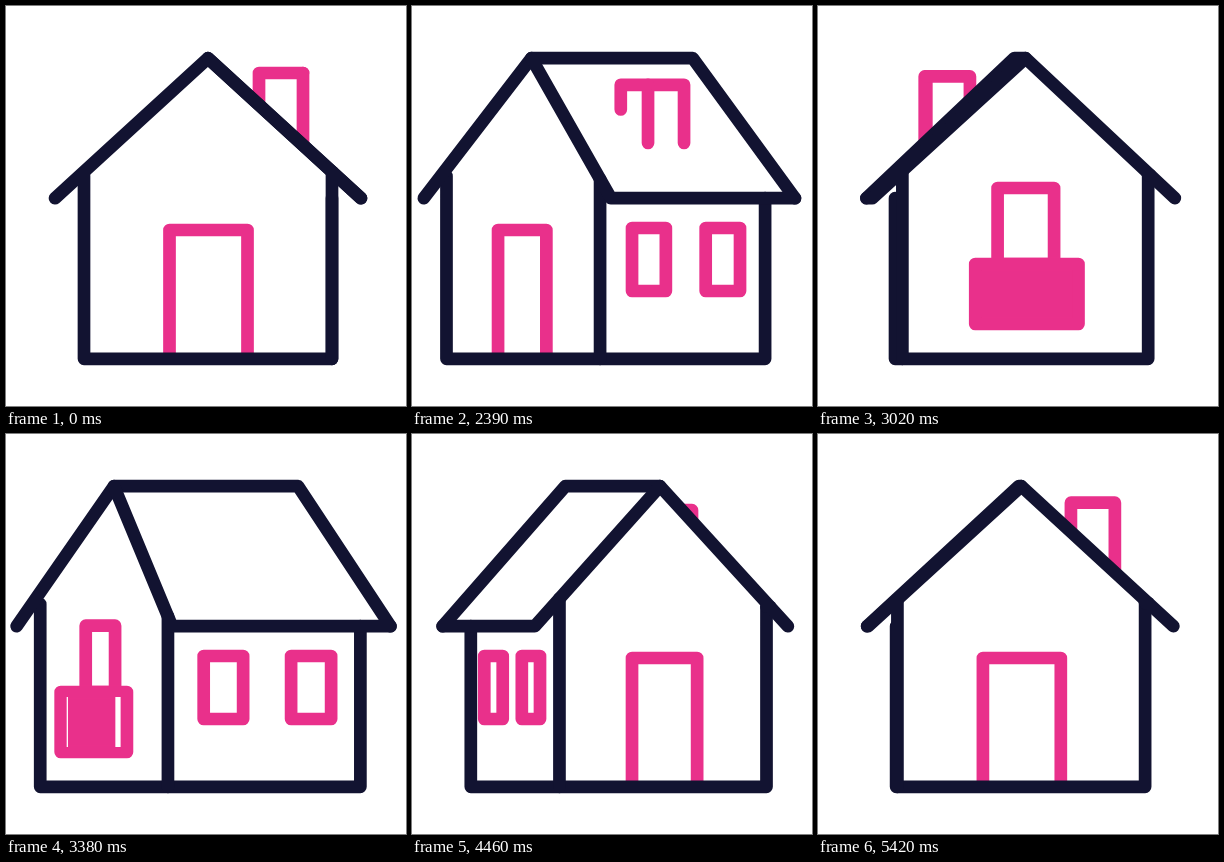
These frames come from a looping animation (400 by 400 pixels, 5450 ms). An HTML page with a canvas:

```html
<!DOCTYPE html>
<html lang="en">
<head>
<meta charset="utf-8">
<title>Turning house</title>
<style>
html, body { margin: 0; width: 100%; height: 100%; overflow: hidden; background: #fff; }
canvas { display: block; width: 400px; height: 400px; }
</style>
</head>
<body>
<canvas id="stage"></canvas>
<script>
const NAVY = '#121331', PINK = '#e9308b', WHITE = '#fff';
const LOOP = 5450, START = 2000, STEP = 30;
const TOP = 52.2, EAVE = 192.2, FLOOR = 352.8;

// Turn of the house: [ms since start, degrees]
const TURN = [[0, 0], [690, 107], [1380, 239], [1950, 299], [2460, 326.6], [2865, 342], [3450, 358]];

const canvas = document.getElementById('stage');
const ctx = canvas.getContext('2d');
const ratio = window.devicePixelRatio || 1;
canvas.width = canvas.height = 400 * ratio;

const rate = i => (TURN[i + 1][1] - TURN[i][1]) / (TURN[i + 1][0] - TURN[i][0]);

function slope(i) {
  if (i === 0) return .06;
  if (i === TURN.length - 1) return rate(i - 1);
  const before = TURN[i][0] - TURN[i - 1][0], after = TURN[i + 1][0] - TURN[i][0];
  return (after * rate(i - 1) + before * rate(i)) / (before + after);
}

function angleAt(ms) {
  if (ms <= 0) return 0;
  let i = 0;
  while (i < TURN.length - 2 && ms > TURN[i + 1][0]) i++;
  const [t0, a] = TURN[i], [t1, b] = TURN[i + 1];
  const h = t1 - t0, u = (ms - t0) / h, v = 1 - u;
  return a * v * v * (1 + 2 * u) + b * u * u * (3 - 2 * u) + h * u * v * (v * slope(i) - u * slope(i + 1));
}

function trace(points, closed) {
  ctx.beginPath();
  points.forEach(([x, y]) => ctx.lineTo(x, y));
  if (closed) ctx.closePath();
}

function line(color, points, closed = false, cap = 'round') {
  trace(points, closed);
  ctx.strokeStyle = color;
  ctx.lineCap = cap;
  ctx.stroke();
}

function fill(color, points) {
  trace(points, true);
  ctx.fillStyle = color;
  ctx.fill();
}

const box = (x0, y0, x1, y1) => [[x0, y0], [x1, y0], [x1, y1], [x0, y1]];

function block(x0, x1) {
  const shape = box(x0, 258, x1, 318);
  fill(PINK, shape);
  line(PINK, shape, true);
}

function drawHouse(degrees) {
  const a = degrees * Math.PI / 180;
  const cos = Math.cos(a), sin = Math.sin(a);
  const C = Math.abs(cos), S = Math.abs(sin);
  const q = sin * cos < 0 ? 1 : -1;      // side on which the gable shows
  const front = cos > 0, rightSide = sin >= 0;
  const depth = S ** 1.75;
  const cx = 200 + 2 * C ** 6;

  // Walls
  const side = 252 * depth;
  const outer = cx + q * (124 * C + side / 2 + 13 * S * C);
  const corner = outer - q * 248 * C;
  const end = corner - q * side;
  const mid = (outer + corner) / 2;

  // Roof
  const eave = 295 * S ** 1.95, span = (306 - 5 * S) * C;
  const tip = cx + q * (span / 2 + eave / 2 + 5.6 * S * C);
  const near = tip - q * span;
  const far = near - q * eave;
  const ridge = 116 * S ** 1.5;
  const apex = cx + q * ridge, back = cx - q * ridge;

  // Chimney
  const cap = 67 + 14 * S ** .7;
  const chimneyX = (x, z) => cx + x * cos - z * depth;

  if (!rightSide) {
    const x0 = chimneyX(51, 0), x1 = chimneyX(95, 0);
    line(PINK, [[x0, 98], [x0, cap], [x1, cap], [x1, 137]]);
  }
  if (front) {
    const peek = 22 * S - 28 * C;
    if (peek > 0) block(end - q * peek, end + q * 8);
  }

  fill(WHITE, [[far, EAVE], [back, TOP], [apex, TOP], [near, EAVE]]);
  fill(WHITE, [[near, EAVE], [apex, TOP], [tip, EAVE]]);
  fill(WHITE, box(end, EAVE, outer, FLOOR));

  if (side > 20) {
    const along = f => end + q * side * f;
    const squeeze = .11 * (1 - S);
    line(PINK, box(along(.152), 222, along(.36), 285), true);
    line(PINK, box(along(.625 - squeeze), 222, along(.83 - squeeze), 285), true);
  }
  if (front) {
    const x = mid + 2 * q * S + .5, half = 39 * C;
    line(PINK, [[x - half, 347], [x - half, 224], [x + half, 224], [x + half, 347]], false, 'butt');
  }
  if (rightSide) {
    const z = front ? 35 : -20;
    const x0 = chimneyX(95, 35), x1 = chimneyX(95, -20);
    const edge = chimneyX(95, z), inner = chimneyX(51, z);
    line(PINK, [[x0, 137], [x0, cap], [x1, cap], [x1, 137]]);
    line(PINK, [[edge, cap], [inner, cap], [inner, 98 + 7 * S]]);
  }

  // Frame
  const reach = Math.abs(apex - near) < 1 ? 1 : (apex - corner) / (apex - near);
  const cornerTop = reach > 0 && reach < 1 ? TOP + (EAVE - TOP) * reach : EAVE;
  const wallTop = q > 0 ? 169 + 12 * S * S : 170;
  line(NAVY, [[end, EAVE], [end, FLOOR], [outer, FLOOR], [outer, wallTop]]);
  line(NAVY, [[corner, cornerTop], [corner, FLOOR]]);
  if (q > 0) {
    const rake = apex + (tip - apex) * (wallTop - TOP) / (EAVE - TOP);
    line(NAVY, [[outer, wallTop], [rake, wallTop]]);
  }
  line(NAVY, [[far, EAVE], [back, TOP], [apex, TOP], [tip, EAVE]]);
  line(NAVY, [[apex, TOP], [near, EAVE], [far, EAVE]]);

  if (!front) {
    const stack = mid + q * 4.3 * S, half = 28.5 * C;
    line(PINK, box(stack - half, 182 + 18 * S ** 4, stack + half, 258), true);
    const rim = mid + q * (51 * C + 20 * S);
    const inside = mid - q * (51 * C - 4 * S);
    const face = mid - q * (51 * C - 17.5 * S);
    block(inside, rim);
    const slot = inside + q * 6.3;
    if ((face - slot) * q > 0) fill(WHITE, box(slot, 263, face, 313));
    if (q < 0) fill(WHITE, box(rim + 6, 263, rim + 7.3, 313));
  }
}

function render() {
  const ms = performance.now() % LOOP;
  const turned = Math.floor((ms - START) / STEP) * STEP;
  ctx.setTransform(ratio, 0, 0, ratio, 0, 0);
  ctx.fillStyle = WHITE;
  ctx.fillRect(0, 0, 400, 400);
  ctx.lineWidth = 12.7;
  ctx.lineJoin = 'round';
  drawHouse(angleAt(turned));
  requestAnimationFrame(render);
}
render();
</script>
</body>
</html>
```
